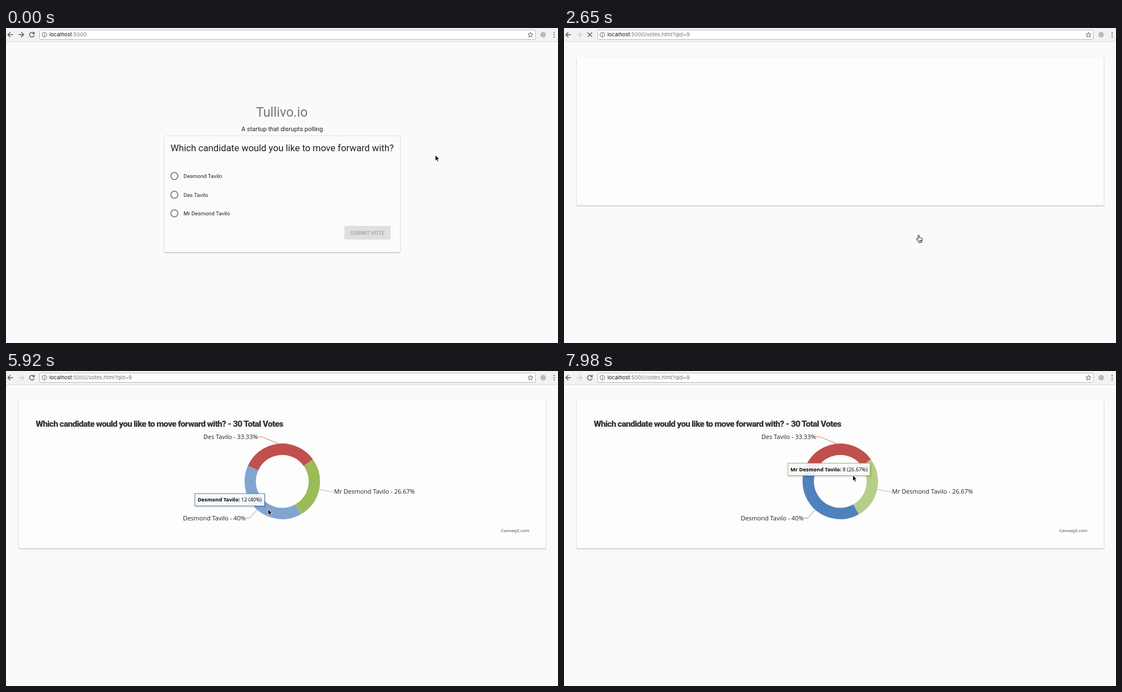
An HTML page for the animation above (8000 ms loop, 992 by 565 pixels).

```html
<!DOCTYPE html>
<html lang="en">
<head>
<meta charset="utf-8">
<title>Poll</title>
<style>
  html, body { margin: 0; height: 100%; overflow: hidden; background: #fafafa; }
  svg { display: block; width: 100vw; height: 100vh; font-family: Roboto, sans-serif; fill: #212121; }
  .line { fill: none; stroke: #5a5a5a; stroke-width: 1.4; }
  .card { filter: drop-shadow(0 .3px .6px rgba(0,0,0,.28)) drop-shadow(0 1px .9px rgba(0,0,0,.3)); }
  .url { font: 9.5px Inter, sans-serif; fill: #777; }
  .option { font-size: 9.74px; }
  .option circle { fill: none; stroke: #5f5f5f; stroke-width: 1.4; }
  .option .dot { fill: #3f51b5; stroke: none; display: none; }
  .chosen circle { stroke: #3f51b5; }
  .chosen .dot { display: inline; }
  #submit { font-size: 9.74px; font-weight: 500; fill: #a6a6a6; }
  #submit rect { fill: #dfdfdf; }
  #submit.ready { fill: #fff; }
  #submit.ready rect { fill: #3f51b5; filter: drop-shadow(0 1px 1px rgba(0,0,0,.35)); }
  #submit.hover rect { fill: #303f9f; }
  .heading { font-size: 15.5px; font-weight: 900; letter-spacing: -.72px; fill: #333; }
  .label, #tip { font-family: "Open Sans", sans-serif; }
  .label { font-size: 11px; }
  .label polyline { fill: none; stroke-width: .8; }
  #tip { font-size: 9.3px; fill: #000; }
  #tip rect { fill: rgba(255,255,255,.9); filter: drop-shadow(1px 1px 1.5px rgba(0,0,0,.25)); }
  .bold { font-weight: 700; }
</style>
</head>
<body>
<svg viewBox="0 0 992 565">
  <rect width="992" height="565" fill="#fafafa"/>

  <g id="toolbar">
    <rect width="992" height="24.5" fill="#f2f2f2"/>
    <path d="M0 24.5H992" stroke="#dcdcdc"/>
    <rect x="60.5" y="3.5" width="891" height="17" rx="2" fill="#fff" stroke="#b8b8b8"/>
    <path class="line" d="M12.5 12H3.5M7.8 7.5L3.3 12L7.8 16.5"/>
    <path class="line" id="forward" d="M22.5 12H31.5M27.2 7.5L31.7 12L27.2 16.5"/>
    <path class="line" id="reload" d="M50 9.4A4.3 4.3 0 1 0 50.8 12.8M50.8 7V10.4H47.2"/>
    <path class="line" id="stop" d="M42.5 8L50.5 16M50.5 8L42.5 16"/>
    <circle class="line" cx="69" cy="12" r="4.2" style="stroke-width:1"/>
    <path class="line" d="M69 11.3V14.5M69 9.3V10.4" style="stroke-width:1.1"/>
    <text class="url" x="78" y="15.4"><tspan fill="#111">localhost</tspan>:5000<tspan id="path">/votes.html?qid=9</tspan></text>
    <path class="line" style="stroke-width:1" d="M942.5 7.6L943.8 10.6L947 10.9L944.6 13L945.3 16.2L942.5 14.5L939.7 16.2L940.4 13L938 10.9L941.2 10.6Z"/>
    <circle cx="965.3" cy="12" r="4.9" fill="#b9b9b9"/>
    <path d="M985 8h.01M985 12h.01M985 16h.01" stroke="#5a5a5a" stroke-width="2.2" stroke-linecap="round"/>
  </g>

  <g id="poll">
    <text x="495.7" y="158.8" font-size="23.5" text-anchor="middle" fill="#757575">Tullivo.io</text>
    <text x="496.2" y="184.7" font-size="11.13" text-anchor="middle">A startup that disrupts polling</text>
    <rect class="card" x="285" y="193.5" width="423" height="208.5" rx="1.4" fill="#fbfbfb"/>
    <text x="295.7" y="220.7" font-size="16.7">Which candidate would you like to move forward with?</text>
    <g id="options"></g>
    <g id="submit">
      <rect x="608" y="355" width="83" height="24.5" rx="1.4"/>
      <text x="649.3" y="370.7" text-anchor="middle">SUBMIT VOTE</text>
    </g>
  </g>

  <g id="results">
    <rect class="card" x="23" y="53" width="947" height="265" rx="1.4" fill="#fdfdfd"/>
    <g id="chart">
      <text class="heading" x="53.5" y="99.8">Which candidate would you like to move forward with? - 30 Total Votes</text>
      <text class="label" x="940.5" y="288.6" text-anchor="end" style="font-size:7.9px" fill="#444">CanvasJS.com</text>
      <g id="ring" fill="none" stroke-width="20.4"></g>
      <g id="labels"></g>
      <g id="tip"><rect height="22"/><text y="14.4" text-anchor="middle"><tspan class="bold"></tspan><tspan></tspan></text></g>
    </g>
  </g>

  <path id="arrow" d="M0 0V10.2L2.4 8L4 11.7L5.8 10.9L4.2 7.3H7.4Z" fill="#000" stroke="#fff" stroke-width=".8"/>
  <path id="hand" d="M-1.2 7.2V1.2Q-1.2 0 -.1 0T1 1.2V4.4Q2.2 3.6 3 4.9Q4.2 4.2 4.9 5.4Q6.4 5.2 6.4 6.8V9Q6.2 10.6 5.2 11.4V13H-.4V11.9Q-2 10.4 -3.9 7.7Q-4.6 6.2 -3.2 6Q-2.2 6 -1.2 7.2ZM1.2 8.6V11M3 8.6V11M4.6 8.6V11" fill="#fff" stroke="#000" stroke-width=".95" stroke-linejoin="round"/>
</svg>

<script>
const LOOP = 8000;
const $ = id => document.getElementById(id);
const show = (id, on) => $(id).style.display = on ? "" : "none";
const clamp = (v, lo, hi) => Math.min(hi, Math.max(lo, v));

const slices = [
  { name: "Desmond Tavilo", votes: 12, share: 40, text: "40%", color: "#4f81bc",
    at: [430.5, 267.6, "end"], line: "451.5,248.5 438,263.8 430.5,263.8", tipWidth: 125 },
  { name: "Des Tavilo", votes: 10, share: 100 / 3, text: "33.33%", color: "#c0504e",
    at: [452.5, 121.9, "end"], line: "490,130.5 460,118 452.5,118", tipWidth: 113 },
  { name: "Mr Desmond Tavilo", votes: 8, share: 80 / 3, text: "26.67%", color: "#9bbb58",
    at: [589.5, 220, "start"], line: "563,212 582,216.2 589.5,216.2", tipWidth: 147.5 }
];

let begin = 0;
slices.forEach((s, i) => {
  const y = 265.5 + 33.5 * i;
  $("options").innerHTML += `<g class="option"><circle cx="302.6" cy="${y}" r="6.4"/>
    <circle class="dot" cx="302.6" cy="${y}" r="3.6"/><text x="319" y="${y + 3.5}">${s.name}</text></g>`;
  $("ring").innerHTML += `<circle cx="496.5" cy="198" r="57.6" pathLength="100" stroke="${s.color}"
    transform="rotate(${60.5 + begin * 3.6} 496.5 198)"/>`;
  const [x, base, anchor] = s.at;
  $("labels").innerHTML += `<g class="label"><polyline points="${s.line}" stroke="${s.color}"/>
    <text x="${x}" y="${base}" text-anchor="${anchor}">${s.name} - ${s.text}</text></g>`;
  s.begin = begin;
  begin += s.share;
});
const arcs = [...$("ring").children];
const option = $("options").firstElementChild;
const [tipBox, tipText] = $("tip").children;

// Waypoints: step, x, y
const pointer = [
  [-1, 771.5, 228], [0, 762, 232], [1, 690, 244], [2, 540, 252], [3, 400, 256], [4, 345, 256.5],
  [6, 345, 256.5], [7, 420, 290], [8, 550, 345], [9, 621, 369.5], [10, 637.5, 371.5],
  [18, 637.5, 371.5], [19, 639, 367], [25, 639, 367], [26, 591, 362], [27, 551.5, 343],
  [30, 490, 262], [33, 470, 250], [34, 470, 250], [36, 471, 248], [38, 456, 222],
  [39, 447, 195], [40, 448, 168], [41, 456, 143], [43, 456, 143], [45, 486, 147],
  [46, 543, 188], [47, 556, 194], [48, 552, 196], [50, 519, 187]
];
// Bottom right corner of the tooltip
const tipPath = [
  [30, 483, 256], [33, 464.5, 242], [36, 464.5, 242], [38, 450, 220], [39, 450, 195],
  [41, 447, 136], [43, 447, 136], [45, 478.5, 141.5], [46, 478.5, 141.5], [48, 550, 187.5]
];

function along(track, step) {
  const next = track.findIndex(p => p[0] >= step);
  if (next < 0) return track.at(-1).slice(1);
  if (next === 0) return track[0].slice(1);
  const a = track[next - 1], b = track[next];
  const u = (step - a[0]) / (b[0] - a[0]);
  return [1, 2].map(i => a[i] + (b[i] - a[i]) * u);
}

// The screen refreshes in steps of about 150 ms.
const stepAt = t => t < 1460 ? Math.max(-1, Math.floor((t - 500) / 165))
                             : 6 + Math.floor((t - 1460) / 148.1);

function drawTip(step) {
  show("tip", step >= 30);
  if (step < 30) return;
  const s = slices[step < 40 ? 0 : step < 47 ? 1 : 2];
  const [right, bottom] = along(tipPath, step);
  $("tip").setAttribute("transform", `translate(${right - s.tipWidth} ${bottom - 22})`);
  tipBox.setAttribute("width", s.tipWidth);
  tipBox.setAttribute("stroke", s.color);
  tipText.setAttribute("x", s.tipWidth / 2);
  tipText.children[0].textContent = s.name + ":";
  tipText.children[1].textContent = ` ${s.votes} (${s.text})`;
}

function draw(step) {
  const loaded = step >= 13;
  const loading = step >= 12 && step < 17;
  show("poll", !loaded);
  show("results", loaded);
  show("path", loaded);
  show("stop", loading);
  show("reload", !loading);
  $("forward").style.opacity = loaded ? .25 : 1;
  option.classList.toggle("chosen", step >= 6);
  $("submit").classList.toggle("ready", step >= 6);
  $("submit").classList.toggle("hover", step >= 9);

  show("chart", step >= 18);
  show("labels", step >= 26);
  const u = clamp((step - 18) / 8, 0, 1);
  const sweep = 100 * (u < .5 ? 2 * u * u : 1 - 2 * (1 - u) ** 2);
  const lit = step < 30 || step === 46 ? -1 : step < 40 ? 0 : step < 46 ? 1 : 2;
  arcs.forEach((arc, i) => {
    const length = clamp(sweep - slices[i].begin, 0, slices[i].share);
    arc.setAttribute("stroke-dasharray", `${length} 100`);
    arc.style.display = length ? "" : "none";
    arc.style.opacity = i === lit ? .7 : 1;
  });
  drawTip(step);

  const isHand = (step >= 4 && step <= 6) || (step >= 9 && step <= 18);
  const [x, y] = along(pointer, step);
  show("hand", isHand);
  show("arrow", !isHand);
  $(isHand ? "hand" : "arrow").setAttribute("transform", `translate(${x} ${y})`);
}

const start = performance.now();
let shown;
function tick() {
  const step = stepAt((performance.now() - start) % LOOP);
  if (step !== shown) draw(shown = step);
  requestAnimationFrame(tick);
}
tick();
</script>
</body>
</html>
```
